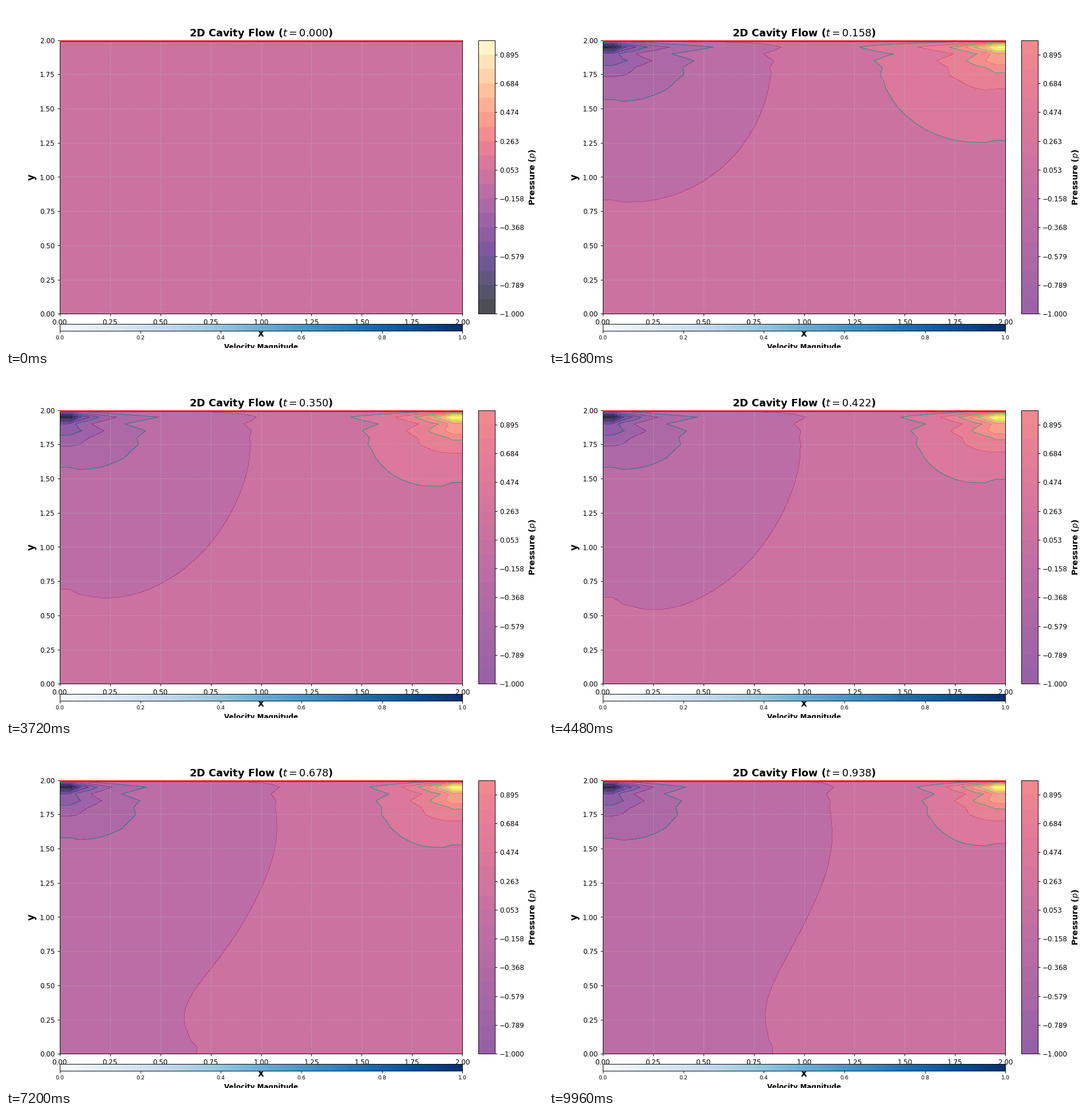
A matplotlib script that plays this animation: 938x597 px, repeating every 10 s.

```python
import numpy as np
import matplotlib.pyplot as plt
from matplotlib.animation import FuncAnimation
from matplotlib.cm import ScalarMappable
from matplotlib.colors import Normalize

WIDTH, HEIGHT = 938, 597
DPI = 85.25
FRAMES, INTERVAL = 250, 40

# Flow parameters
N = 41
SIZE = 2.0
H = SIZE / (N - 1)
RHO, NU = 1.0, 0.1
FRAME_TIME = 0.0037657
SUBSTEPS = 4
DT = FRAME_TIME / SUBSTEPS
SWEEPS = 50


def pressure_source(u, v):
    ux = (u[1:-1, 2:] - u[1:-1, :-2]) / (2 * H)
    uy = (u[2:, 1:-1] - u[:-2, 1:-1]) / (2 * H)
    vx = (v[1:-1, 2:] - v[1:-1, :-2]) / (2 * H)
    vy = (v[2:, 1:-1] - v[:-2, 1:-1]) / (2 * H)
    return RHO * ((ux + vy) / DT - ux**2 - 2 * uy * vx - vy**2)


def relax_pressure(p, source):
    """Jacobi sweeps: zero pressure on the lid, zero gradient on the walls."""
    shift = source * H**2 / 4
    for _ in range(SWEEPS):
        inner = p[1:-1, 2:] + p[1:-1, :-2]
        inner += p[2:, 1:-1]
        inner += p[:-2, 1:-1]
        inner *= 0.25
        inner -= shift
        p[1:-1, 1:-1] = inner
        p[:, -1] = p[:, -2]
        p[0, :] = p[1, :]
        p[:, 0] = p[:, 1]
        p[-1, :] = 0


def advect_diffuse(f, u, v, grad):
    """One explicit step with upwind advection for the inner points."""
    c = f[1:-1, 1:-1]
    west, east = f[1:-1, :-2], f[1:-1, 2:]
    south, north = f[:-2, 1:-1], f[2:, 1:-1]
    flow = u[1:-1, 1:-1] * (c - west) + v[1:-1, 1:-1] * (c - south)
    spread = east + west + north + south - 4 * c
    return c - DT / H * flow - DT / (2 * RHO * H) * grad + NU * DT / H**2 * spread


def step(u, v, p):
    relax_pressure(p, pressure_source(u, v))
    new_u = advect_diffuse(u, u, v, p[1:-1, 2:] - p[1:-1, :-2])
    new_v = advect_diffuse(v, u, v, p[2:, 1:-1] - p[:-2, 1:-1])
    u[1:-1, 1:-1] = new_u
    v[1:-1, 1:-1] = new_v
    u[-1, :] = 1


def simulate():
    u, v, p = (np.zeros((N, N)) for _ in range(3))
    history = [p.copy()]
    for _ in range(FRAMES - 1):
        for _ in range(SUBSTEPS):
            step(u, v, p)
        history.append(p.copy())
    return history


pressures = simulate()
grid = np.linspace(0, SIZE, N)
X, Y = np.meshgrid(grid, grid)

# The small margin guards against rounding down to one pixel less.
fig = plt.figure(figsize=((WIDTH + 1e-4) / DPI, (HEIGHT + 1e-4) / DPI), dpi=DPI)
ax = fig.add_axes([0.1, 0.1, 0.75, 0.8])
pressure_ax = fig.add_axes([0.88, 0.1, 0.03, 0.8])
speed_ax = fig.add_axes([0.1, 0.05, 0.75, 0.02])

ax.set_xlim(0, SIZE)
ax.set_ylim(0, SIZE)
ax.set_xlabel("x", fontsize=14, fontweight="bold")
ax.set_ylabel("y", fontsize=14, fontweight="bold")
ax.grid(True, linestyle="--", alpha=0.6)
ax.plot([0, SIZE], [SIZE, SIZE], color="red", linewidth=5, zorder=5)
title = ax.set_title("", fontsize=15, fontweight="bold")


def draw_fill(p):
    """Filled bands over the pressure range, or over -1..1 for a flat field."""
    low, high = (p.min(), p.max()) if np.ptp(p) > 0 else (-1, 1)
    levels = np.linspace(low, high, 20)
    return ax.contourf(X, Y, p, levels=levels, cmap="magma", alpha=0.7)


drawn = [draw_fill(pressures[0])]
pressure_bar = fig.colorbar(drawn[0], cax=pressure_ax)
pressure_bar.set_label("Pressure ($p$)", fontsize=12, fontweight="bold")

speed_bar = fig.colorbar(ScalarMappable(Normalize(0, 1), "Blues"),
                         cax=speed_ax, orientation="horizontal")
speed_bar.set_label("Velocity Magnitude", fontsize=10, fontweight="bold")
speed_bar.ax.tick_params(labelsize=8)


def update(i):
    while drawn:
        drawn.pop().remove()
    p = pressures[i]
    fill = draw_fill(p)
    drawn.append(fill)
    if np.ptp(p) > 0:
        drawn.append(ax.contour(X, Y, p, levels=fill.levels[::2],
                                cmap="viridis", linewidths=0.8))
    # The bar keeps its -1..1 scale but takes the colours of the new range.
    pressure_bar.solids.set_norm(fill.norm)
    title.set_text(f"2D Cavity Flow ($t = {i * FRAME_TIME:.3f}$)")
    return drawn


anim = FuncAnimation(fig, update, frames=FRAMES, interval=INTERVAL,
                     repeat=True, repeat_delay=0)
plt.show()
```
